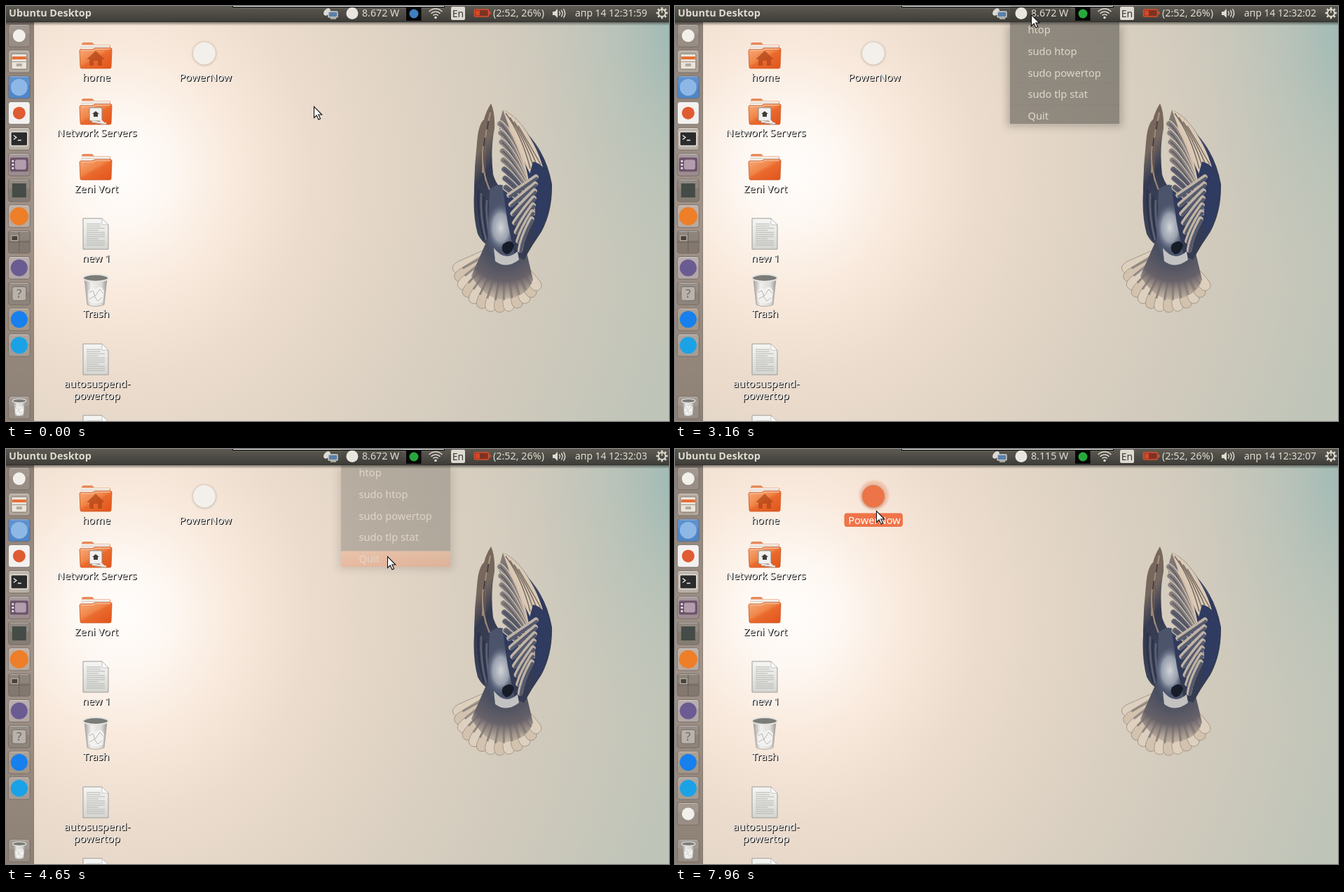
An HTML page that plays this animation: 946x592 px, repeating every 8000 ms.

```html
<!DOCTYPE html>
<html lang="en">
<head>
<meta charset="utf-8">
<title>Power indicator</title>
<style>
html, body { margin: 0; width: 100%; height: 100%; overflow: hidden; background: #d9cec0; }
svg { display: block; font: 14.67px "Noto Sans", "Open Sans", sans-serif; }
.label { fill: #fff; text-anchor: middle; filter: drop-shadow(1px 1px .4px #111) drop-shadow(0 0 .7px rgba(40, 30, 20, .6)); }
.label.plain { filter: none; }
.bar { fill: #dfdbd2; }
</style>
</head>
<body>
<svg id="stage" width="946" height="592" viewBox="0 0 946 592">
<defs>
  <radialGradient id="light" gradientUnits="userSpaceOnUse" cx="165" cy="235" r="820" gradientTransform="translate(0 -24) scale(1 1.1)">
    <stop offset="0" stop-color="#fffdfb"/><stop offset=".08" stop-color="#fef8f3"/>
    <stop offset=".19" stop-color="#f9eadd"/><stop offset=".33" stop-color="#ecdccd"/>
    <stop offset=".55" stop-color="#dcd1c2"/><stop offset=".75" stop-color="#d0cabc"/><stop offset="1" stop-color="#bec4b8"/>
  </radialGradient>
  <radialGradient id="teal" gradientUnits="userSpaceOnUse" cx="970" cy="40" r="260" gradientTransform="translate(0 -24) scale(1 1.6)">
    <stop offset="0" stop-color="#8db5b4" stop-opacity=".75"/><stop offset=".4" stop-color="#a6bcb6" stop-opacity=".38"/>
    <stop offset="1" stop-color="#c4c8bd" stop-opacity="0"/>
  </radialGradient>
  <linearGradient id="panel" x2="0" y2="1"><stop stop-color="#5d5a52"/><stop offset="1" stop-color="#3d3c37"/></linearGradient>
  <linearGradient id="drop" x2="0" y2="1"><stop stop-color="#000" stop-opacity=".45"/><stop offset="1" stop-color="#000" stop-opacity="0"/></linearGradient>
  <linearGradient id="dock" x2="0" y2="1"><stop stop-color="#8d8177"/><stop offset=".5" stop-color="#a19389"/><stop offset="1" stop-color="#8d8075"/></linearGradient>
  <linearGradient id="folder" x2=".9" y2="1"><stop stop-color="#f7ab7c"/><stop offset=".45" stop-color="#f08547"/><stop offset=".55" stop-color="#ea6a2e"/><stop offset="1" stop-color="#e2561c"/></linearGradient>
  <linearGradient id="pick" x2="0" y2="1"><stop stop-color="#f38a5a"/><stop offset="1" stop-color="#e8642f"/></linearGradient>
  <linearGradient id="paper" x2="0" y2="1"><stop stop-color="#f6f6f4"/><stop offset="1" stop-color="#d5d5d1"/></linearGradient>
  <linearGradient id="metal"><stop stop-color="#9b9b98"/><stop offset=".3" stop-color="#f1f0ee"/><stop offset=".75" stop-color="#dcdbd8"/><stop offset="1" stop-color="#929290"/></linearGradient>
  <linearGradient id="slim" x2=".3" y2="1"><stop stop-color="#7a6656"/><stop offset=".35" stop-color="#76685f"/><stop offset=".55" stop-color="#343a50"/><stop offset="1" stop-color="#3e4558"/></linearGradient>
  <linearGradient id="navy" x2=".4" y2="1"><stop stop-color="#8f8176"/><stop offset=".35" stop-color="#525568"/><stop offset=".55" stop-color="#2f3a5e"/><stop offset="1" stop-color="#363c50"/></linearGradient>
  <radialGradient id="tail" gradientUnits="userSpaceOnUse" cx="712" cy="335" r="96">
    <stop offset=".3" stop-color="#4a4f5f"/><stop offset=".6" stop-color="#676169"/><stop offset="1" stop-color="#a4927f" stop-opacity="0"/>
  </radialGradient>
  <radialGradient id="chest"><stop stop-color="#d3d5d8"/><stop offset=".55" stop-color="#a6adb9" stop-opacity=".85"/><stop offset="1" stop-color="#4a5470" stop-opacity="0"/></radialGradient>
  <filter id="soft" x="-30%" y="-30%" width="160%" height="160%"><feGaussianBlur stdDeviation="6"/></filter>
  <filter id="haze" x="-50%" y="-50%" width="200%" height="200%"><feGaussianBlur stdDeviation="1.6"/></filter>
</defs>
</svg>
<script>
const stage = document.getElementById('stage');
const attrs = o => Object.entries(o).map(([k, v]) => ` ${k}="${v}"`).join('');
const rect = (x, y, width, height, fill, more = {}) => `<rect${attrs({ x, y, width, height, fill, ...more })}/>`;
const disc = (cx, cy, r, fill, more = {}) => `<circle${attrs({ cx, cy, r, fill, ...more })}/>`;
const path = (d, fill, more = {}) => `<path${attrs({ d, fill, ...more })}/>`;
const line = (d, stroke, width = 1, more = {}) => path(d, 'none', { stroke, 'stroke-width': width, ...more });
const text = (s, x, y, more = {}) => `<text${attrs({ x, y, ...more })}>${s}</text>`;
const group = (body, more = {}) => `<g${attrs(more)}>${body}</g>`;
const move = (x, y, body) => group(body, { transform: `translate(${x} ${y})` });
const range = (n, f) => Array.from({ length: n }, (_, i) => f(i)).join('');
const label = (s, x, y, more = {}) => text(s, x, y, { class: 'label', ...more });

function bird() {
  const leftWing = 'M692 139Q685 150 682 162Q674 168 672 195Q668 230 668 265Q666 300 673 325Q681 341 692 342L712 326L708 262Q699 254 695 240Q691 205 697 175Q698 152 692 139Z';
  const rightWing = 'M709 148Q728 155 746 184Q772 214 779 254Q780 292 764 322Q750 342 739 362L726 356L716 310L709 262Q720 250 714 235L703 170Z';
  const round = { 'stroke-linecap': 'round' };
  const tail = range(13, i => {
    const size = 85 + 18 * Math.sin(Math.PI * i / 12);
    return path(`M0 0L${size - 12} -8Q${size} -9 ${size} 0Q${size} 8 ${size - 12} 8Z`, i % 2 ? '#d2c2ae' : '#ddd0be',
      { transform: `translate(712 335) rotate(${150 - i * 7.9})`, stroke: '#8a7c70', 'stroke-width': .6 });
  });
  const vanes = range(12, i => {
    const angle = (147 - i * 8) * Math.PI / 180, far = 72 + 14 * Math.sin(Math.PI * i / 11);
    return line(`M712 340L${712 + far * Math.cos(angle)} ${335 + far * Math.sin(angle)}`, '#55525a', 3, { opacity: .5 });
  });
  const slivers = range(5, i => line(`M${691 - i * 2.5} ${152 + i * 12}Q${681 - i} ${200 + i * 8} ${680 + i * 2.5} ${238 + i * 6}`,
    i % 2 ? '#332f38' : '#b39b85', 2.2, { opacity: .8 }));
  const mantle = range(5, i => line(`M${674 + i * 4} ${262 + i * 5}Q${672 + i * 4} 300 ${682 + i * 3} 334`, i % 2 ? '#6b7080' : '#262d47', 2.5, { opacity: .7 }));
  const quills = range(8, i => {
    const d = `M${705 + i * 1.2} ${168 + i * 13}Q${720 + i} ${178 + i * 13} ${738 + i * 2} ${238 + i * 8}`;
    return line(d, '#d3c3b0', 10, round) + line(d, i < 5 ? '#85807f' : '#5c6070', 7.5, round) + line(d, '#464857', 2, { opacity: .6 });
  });
  const secondaries = range(7, i => {
    const d = `M${756 - i} ${244 + i * 10}Q${736} ${258 + i * 12} ${718 + i * 2.6} ${270 + i * 13}`;
    return line(d, '#c0b3a5', 7.5, round) + line(d, '#555b6e', 4.5, { ...round, transform: 'translate(1 2)' });
  });
  return path(leftWing, 'url(#slim)') + slivers + mantle + tail + vanes
    + path('M686 335L664 385Q690 428 722 416Q745 412 752 390L740 340Z', 'url(#tail)')
    + path('M690 262Q705 248 718 262L738 345Q733 366 714 370Q694 362 687 335Z', '#4b546b')
    + `<ellipse cx="706" cy="316" rx="21" ry="36" fill="url(#chest)"/>`
    + path(rightWing, 'url(#navy)')
    + path('M709 148Q731 158 747 187Q760 208 766 230L750 244Q722 187 709 148Z', '#d9cab6')
    + path('M716 170Q738 202 746 250L734 254Q728 205 716 170Z', '#e2c0aa')
    + range(4, i => line(`M${713 + i * 6} ${153 + i * 6}Q${736 + i * 4} ${184 + i * 5} ${748 + i * 5} ${232 - i * 2}`, '#75675d', 1.4))
    + quills + path('M752 222Q772 226 777 256Q778 290 764 318L750 336Q762 280 746 244Z', '#2f3b60') + secondaries
    + path('M696 345Q712 366 730 350L732 362Q714 376 698 364Z', '#c3c2c2')
    + path('M709 340Q720 331 725 341Q722 354 713 354Q705 348 709 340Z', '#171c29');
}

const folder = (y, emblem = '') => move(105, y,
  path('M3 4Q3 1 6 1H18L21 4H42Q44 4 44 7V20H2Z', '#e88a5a')
  + path('M3 4.5H43V20H3Z', '#f5f0ea') + line('M3 7.5H43', '#d9cdc2')
  + path('M0 13Q0 11 2 11H18L22 9H44Q46 9 46 11L45 36Q45 38 43 38H3Q1 38 1 36Z', 'url(#folder)', { stroke: '#c9551f', 'stroke-width': .8 })
  + line('M2 12.5H19L23 10.5H44', '#f9c8a9') + emblem);
const house = path('M23 13L36 25H32V34H26V27H20V34H14V25H10Z', '#b5481a', { opacity: .8 });
const server = rect(14, 14, 18, 19, '#f1f0ee', { rx: 2, stroke: '#8b8782' }) + path('M23 19L28 23H26V27H20V23H18Z', '#3e3c39')
  + line('M18 34L38 37M29 31L36 38', '#eeece8', 3) + line('M18 35L38 38', '#8b8782', .8);
const sheet = y => move(110, y,
  path('M0 1H27L36 10V45H0Z', 'url(#paper)', { stroke: '#9c9b97', 'stroke-width': 1 })
  + path('M27 1V10H36Z', '#fff', { stroke: '#aaa', 'stroke-width': .7 })
  + range(11, i => line(`M5 ${9 + i * 3}H${i % 4 === 3 ? 22 : i < 2 ? 25 : 31}`, '#b4b4b0')));
const bin = path('M3 7L7 44Q19 49 31 44L35 7Z', 'url(#metal)', { stroke: '#8d8d89', 'stroke-width': .7, opacity: .9 })
  + path('M8 26Q13 17 19 22Q27 15 31 25L29 40Q18 45 9 39Z', '#f3f2f0')
  + line('M9 27L15 24L18 32L25 22L30 28M10 36L17 32L22 39L28 34', '#b5b5b1')
  + `<ellipse cx="19" cy="6" rx="18" ry="5" fill="#7b7b78" stroke="#e4e4e1" stroke-width="2"/>`;

// Launcher tiles: fill and contents, drawn around each tile centre.
const round = (r, fill) => disc(0, 0, r, fill);
const tiles = [
  ['#998e85', round(9, '#f3f0ec')],
  ['#b0a59a', rect(-11, -11, 22, 22, '#e9e4dc', { rx: 2, stroke: '#807468' }) + rect(-10, -7, 20, 4, '#e76d34') + line('M-10 .5H10', '#9b9184') + rect(-4, 3, 8, 4, '#b3a999')],
  ['#4f86c8', round(12, '#8db8e6')],
  ['#f3f1ef', round(9, '#df5b32')],
  ['#b8afa5', rect(-12, -10, 24, 20, '#2c2b2c', { rx: 2, stroke: '#e6e2dc', 'stroke-width': 1.5 }) + line('M-8 -5L-4 -2L-8 1M-2 2H3', '#eee', 1.4)],
  ['#9c8d90', rect(-13, -10, 26, 20, '#6d5369', { rx: 2 }) + rect(-6, -7, 16, 14, '#b19dad', { rx: 3 }) + disc(-9, -5, 1.5, '#eee') + disc(-9, 0, 1.5, '#eee') + disc(-9, 5, 1.5, '#eee')],
  ['#857d74', rect(-10, -10, 20, 20, '#454b47')],
  ['#b8aaa0', round(13, '#ee7e27')],
  ['#82786f', line('M0 -15V15M-15 0H15', '#695f58') + rect(-11, -9, 9, 7, '#47423e', { stroke: '#c8c0b6' })],
  ['#b2a7a5', round(12, '#6b5b93')],
  ['#8d847c', rect(-10, -10, 20, 20, '#b8b2ab', { rx: 3, stroke: '#746b64' }) + text('?', 0, 6, { 'text-anchor': 'middle', fill: '#6c655f', 'font-size': 17 })],
  ['#a39688', round(12, '#1780ec')],
  ['#a49c94', round(12, '#1ba2e6')]
];
const tile = (y, fill, body, more = {}) => group(
  rect(-15.5, -16, 31, 32, fill, { rx: 3.5, stroke: '#70665e', 'stroke-width': .8 })
  + line('M-13 -15H13', '#fff', 1, { opacity: .4 })
  + rect(-15, -15.5, 30, 13, '#fff', { rx: 3, opacity: .09 }) + body,
  { transform: `translate(18.8 ${y})`, ...more });

const remote = screen => `<ellipse cx="7" cy="7.5" rx="4" ry="6" transform="rotate(40 7 7.5)" fill="#dedbd5"/>`
  + rect(9, 7, 13, 8, screen, { rx: 1, stroke: '#d5d2cc', 'stroke-width': 1.4 }) + line('M12 17H20', '#d5d2cc', 1.4);
const gear = move(936, 10, disc(0, 0, 5, 'none', { stroke: '#dfdbd2', 'stroke-width': 2 })
  + range(8, i => rect(-1.3, -8.2, 2.6, 3, '#dfdbd2', { transform: `rotate(${i * 45})` })) + line('M0 -4V0', '#dfdbd2', 1.4));
const wifi = range(3, i => {
  const r = 5 + i * 4, k = r * .72;
  return line(`M${613 - k} ${17 - r * .69}A${r} ${r} 0 0 1 ${613 + k} ${17 - r * .69}`, '#dfdbd2', 1.6);
}) + disc(613, 16.5, 1.8, '#dfdbd2');
const speaker = path('M780 8H783L787 4V17L783 13H780Z', '#dfdbd2')
  + range(3, i => line(`M${789 + i * 3.2} ${7.5 - i * 1.7}Q${792 + i * 4} 10.5 ${789 + i * 3.2} ${13.5 + i * 1.7}`, '#dfdbd2', 1.4));
const battery = rect(668.5, 5, 20, 10, '#7d3322', { rx: 1.5, stroke: '#dc4f2c', 'stroke-width': 1.6 })
  + rect(689.5, 8, 2, 4, '#dc4f2c') + rect(670, 6.5, 6, 7, '#d9482a');

const items = ['htop', 'sudo htop', 'sudo powertop', 'sudo tlp stat', 'Quit'];
const rowY = i => 22.4 + i * 30.8;
const menu = rect(474, 28, 164, 144, '#000', { opacity: .42, filter: 'url(#soft)' })
  + rect(478, 0, 87, 23, '#383732', { opacity: .55 })
  + rect(478, 23, 156, 145, '#41403a')
  + range(4, i => line(`M478 ${48.5 + i * 30.8}H634`, '#393833'))
  + rect(478, 0, 156, 22.5, 'url(#pick)', { id: 'hover' })
  + items.map((s, i) => text(s, 503.5, 39.2 + i * 30.7, { class: 'bar' })).join('');

stage.insertAdjacentHTML('beforeend',
  rect(0, 0, 946, 592, 'url(#light)') + rect(0, 0, 946, 592, 'url(#teal)') + bird()
  + folder(51, house) + label('home', 129, 106.5)
  + folder(131, server) + label('Network Servers', 129.5, 186)
  + folder(210) + label('Zeni Vort', 129, 265.5)
  + sheet(302) + label('new 1', 129, 364.5)
  + move(109, 382, bin) + label('Trash', 128.5, 444)
  + sheet(481) + label('autosuspend-', 130, 543.5) + label('powertop', 129.5, 560.5) + sheet(583)
  + disc(284, 66, 21, '#f08a63', { id: 'ghost', opacity: .38, filter: 'url(#haze)' })
  + disc(283, 68, 17, '#8a7d70', { opacity: .4, filter: 'url(#haze)' })
  + disc(283, 67.5, 16, '#f3efea', { id: 'launch' })
  + rect(241.5, 91.5, 83.5, 19.5, '#ef7449', { id: 'chosen', rx: 4 }) + label('PowerNow', 284.5, 106.5, { id: 'caption' })
  + rect(0, 23, 40, 569, 'url(#dock)') + line('M39.5 23V592', '#7e736a', 1, { opacity: .6 })
  + tiles.map(([fill, body], i) => tile(42.3 + i * 36.8, fill, body)).join('')
  + tile(520.5, '#998e85', disc(0, 0, 9, '#f3f0ec', { id: 'newDisc' }), { id: 'newTile' })
  + tile(573, '#998e85', group(bin, { transform: 'translate(-10 -13) scale(.54)' }))
  + rect(0, 23, 946, 5, 'url(#drop)') + rect(0, 0, 946, 23, 'url(#panel)') + line('M0 22.5H946', '#32312d')
  + rect(323.5, -3, 302, 4.5, '#fff', { stroke: '#000' })
  + group(menu, { id: 'menu' })
  + text('Ubuntu Desktop', 4, 14.8, { class: 'bar', 'font-weight': 700, 'font-size': 14.4 })
  + group(move(451, 1, remote('#5b7fa8')) + disc(494, 10.5, 8.5, '#e9e6e0') + text('', 508, 15, { id: 'watts', class: 'bar', 'font-size': 14.2 }), { id: 'power' })
  + group(move(539, 1, remote('#85827b')), { id: 'alone' })
  + rect(571, 1, 21.5, 20, '#060606') + disc(582, 11, 6.5, '#3e7fc1', { id: 'link' })
  + wifi + rect(635, 1, 20, 19, '#dedad1', { rx: 2 }) + text('En', 645, 15.5, { 'text-anchor': 'middle', fill: '#3c3b37', 'font-size': 14 })
  + battery + text('(2:52, 26%)', 695, 15, { class: 'bar', 'font-size': 14.35 }) + speaker
  + text('', 812, 15, { id: 'clock', class: 'bar', 'font-size': 13.85 }) + gear
  + group(path('M.5 .5V16.5L4.2 13L7 19L9.6 17.8L6.8 12H11.8Z', '#fff', { stroke: '#111', 'stroke-width': 1.1 }), { id: 'pointer' }));

const el = id => document.getElementById(id);
const LOOP = 8000, STEP = 80;
const smooth = u => u * u * (3 - 2 * u);
const glide = (start, count, [x0, y0], [x1, y1]) => Array.from({ length: count }, (_, i) => {
  const u = smooth((i + 1) / count);
  return [start + i * STEP, [Math.round(x0 + (x1 - x0) * u), Math.round(y0 + (y1 - y0) * u)]];
});
const pointerSteps = [
  [0, [439, 143]],
  ...glide(2370, 8, [439, 143], [508, 12]),
  [3550, [523, 63]], [3630, [536, 109]], [3710, [541, 130]], [3790, [543, 142]], [3870, [544, 148]], [3950, [544, 150]], [4100, [544, 153]],
  ...glide(5190, 10, [544, 153], [286, 87]), [6070, [287, 88]]
];
const menuSteps = [[0, 0], [3160, .5], [3240, 1], [4650, .27], [4730, 0]];
const hoverSteps = [[0, -1], [3550, 0], [3630, 1], [3710, 2], [3790, 3], [3870, 4]];
const trayModes = [[0, '8.672 W'], [4730, ''], [7080, '8.115 W']];
const newTileSteps = [[0, 0], [6850, .5], [6930, 1]];
const newDiscSteps = [[0, 1], [7080, .75], [7160, .88], [7400, 1]];
const iconSteps = [[0, '#f3efea'], [5910, '#fffdfb'], [6690, '#ec7448']];
const ticks = [900, 1910, 2930, 3950, 4880, 5910, 6930, 7960];
const at = (steps, t) => steps.reduce((v, [time, value]) => t >= time ? value : v, steps[0][1]);
const set = (id, name, value) => el(id).setAttribute(name, value);

function render(t) {
  const n = ticks.filter(k => t >= k).length;
  el('clock').textContent = 'апр 14 12:' + (n ? '32:0' + (n - 1) : '31:59');
  const [x, y] = at(pointerSteps, t);
  set('pointer', 'transform', `translate(${x} ${y})`);
  set('menu', 'opacity', at(menuSteps, t));
  const row = at(hoverSteps, t);
  set('hover', 'opacity', row < 0 ? 0 : 1);
  set('hover', 'y', rowY(Math.max(row, 0)));
  const watts = at(trayModes, t);
  el('watts').textContent = watts;
  set('power', 'opacity', watts ? 1 : 0);
  set('alone', 'opacity', watts ? 0 : 1);
  set('link', 'fill', t < 3160 ? '#3e7fc1' : '#28a83c');
  const selected = t >= 6690;
  set('launch', 'fill', at(iconSteps, t));
  set('ghost', 'opacity', selected ? .38 : 0);
  set('chosen', 'opacity', selected ? 1 : 0);
  el('caption').classList.toggle('plain', selected);
  set('newTile', 'opacity', at(newTileSteps, t));
  set('newDisc', 'opacity', at(newDiscSteps, t));
}

const start = performance.now();
function frame() {
  render((performance.now() - start) % LOOP);
  requestAnimationFrame(frame);
}
frame();
</script>
</body>
</html>
```
